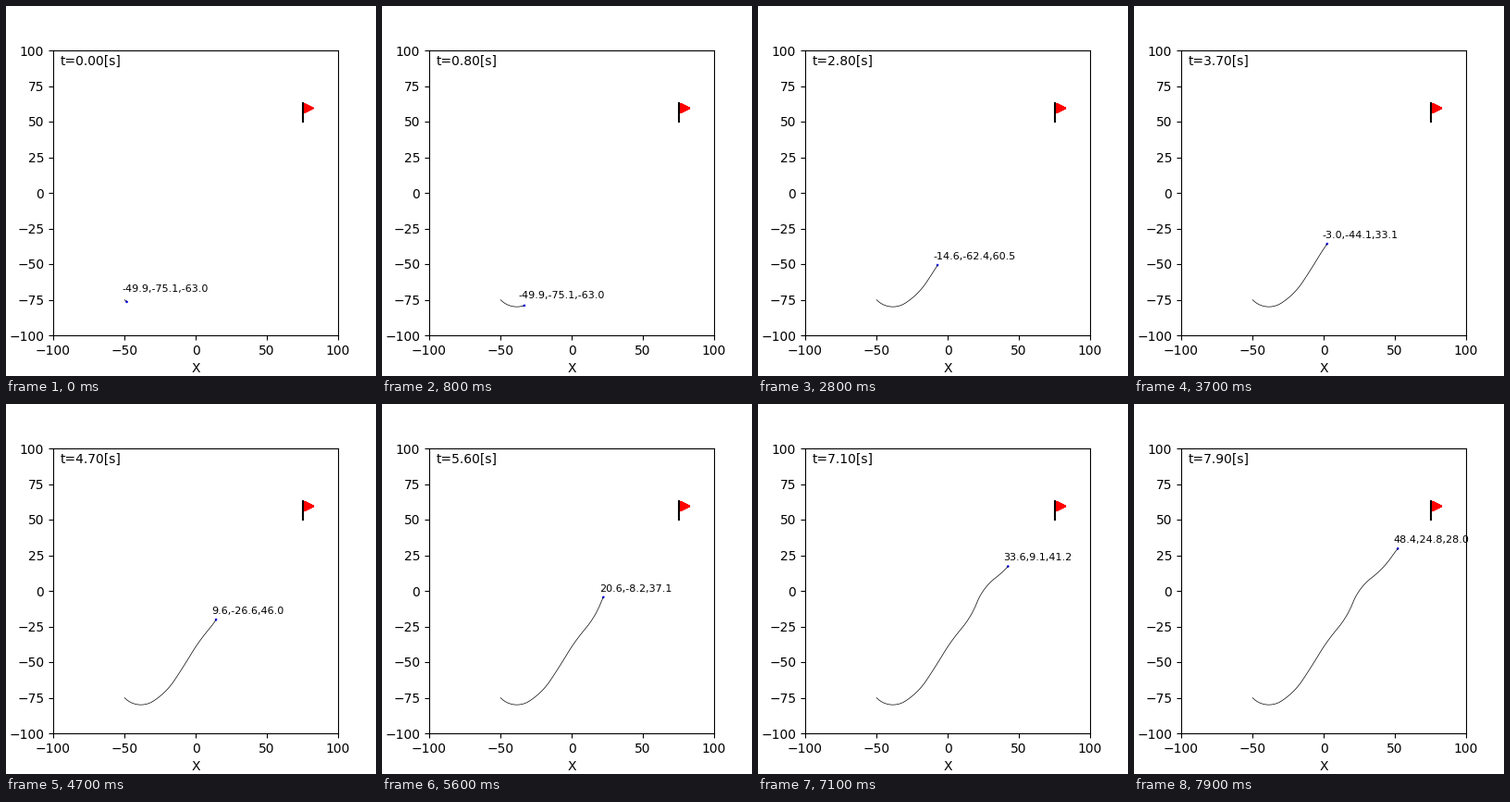
Animation of 400 by 400 pixels, one loop 8000 ms. Source, as a matplotlib script:

```python
import numpy as np
import matplotlib.pyplot as plt
from matplotlib.animation import FuncAnimation
from matplotlib.patches import Circle

FRAMES, DT = 80, 0.1
HOLD = 11                      # steps between position fixes
START = np.radians(-46)        # first heading
R = 0.2                        # robot radius
COATS = 10                     # flag cloth is painted over until its edge is firm

# Position fixes: x, y, compass in degrees
FIXES = [(-49.9, -75.1, -63.0), (-29.7, -77.4, 56.6), (-14.6, -62.4, 60.5),
         (-3.0, -44.1, 33.1), (9.6, -26.6, 46.0), (20.6, -8.2, 37.1),
         (33.6, 9.1, 41.2), (48.4, 24.8, 28.0), (63.5, 40.5, 45.0)]


def drive(fixes, heading):
    """Chain circular arcs through the fixes, each tangent to the last."""
    u = np.arange(HOLD) / HOLD
    pts = [complex(x, y) for x, y, _ in fixes]
    path = []
    for a, b in zip(pts, pts[1:]):
        half = np.angle(b - a) - heading
        path.append(a + (b - a) * np.sin(half * u) / np.sin(half)
                    * np.exp(1j * half * (u - 1)))
        heading += 2 * half
    return np.concatenate(path)


path = drive(FIXES, START)
nose_tip = path + R * np.exp(1j * np.angle(np.gradient(path)))

fig = plt.figure(figsize=(4, 4), dpi=100)
ax = fig.add_subplot(111)
ax.set_aspect("equal")
ax.set_xlim(-100, 100)
ax.set_ylim(-100, 100)
ax.set_xlabel("X")

cloths = [ax.scatter(79, 60, s=50, marker=">", color="red") for _ in range(COATS)]
ax.plot([75, 75], [50, 63], color="black")

clock = ax.text(-95, 90, "", fontsize=10)
label = ax.text(0, 0, "", fontsize=8)
nose, = ax.plot([], [], color="blue")
body = ax.add_patch(Circle((0, 0), R, fill=False, color="blue"))
trail, = ax.plot([], [], color="black", linewidth=0.5)


def update(k):
    n = k + 1
    pos, tip = path[n], nose_tip[n]
    for i, cloth in enumerate(cloths):
        cloth.set_visible(i < k + 2)
    clock.set_text(f"t={k * DT:.2f}[s]")
    label.set_position((path[k].real - 2, path[k].imag + 5.5))
    label.set_text("{:.1f},{:.1f},{:.1f}".format(*FIXES[n // HOLD]))
    nose.set_data([pos.real, tip.real], [pos.imag, tip.imag])
    body.center = pos.real, pos.imag
    trail.set_data(path[:n + 1].real, path[:n + 1].imag)
    return clock, label, nose, body, trail, *cloths


anim = FuncAnimation(fig, update, frames=FRAMES, interval=100,
                     init_func=lambda: update(0), repeat=True, repeat_delay=0)
plt.show()
```
